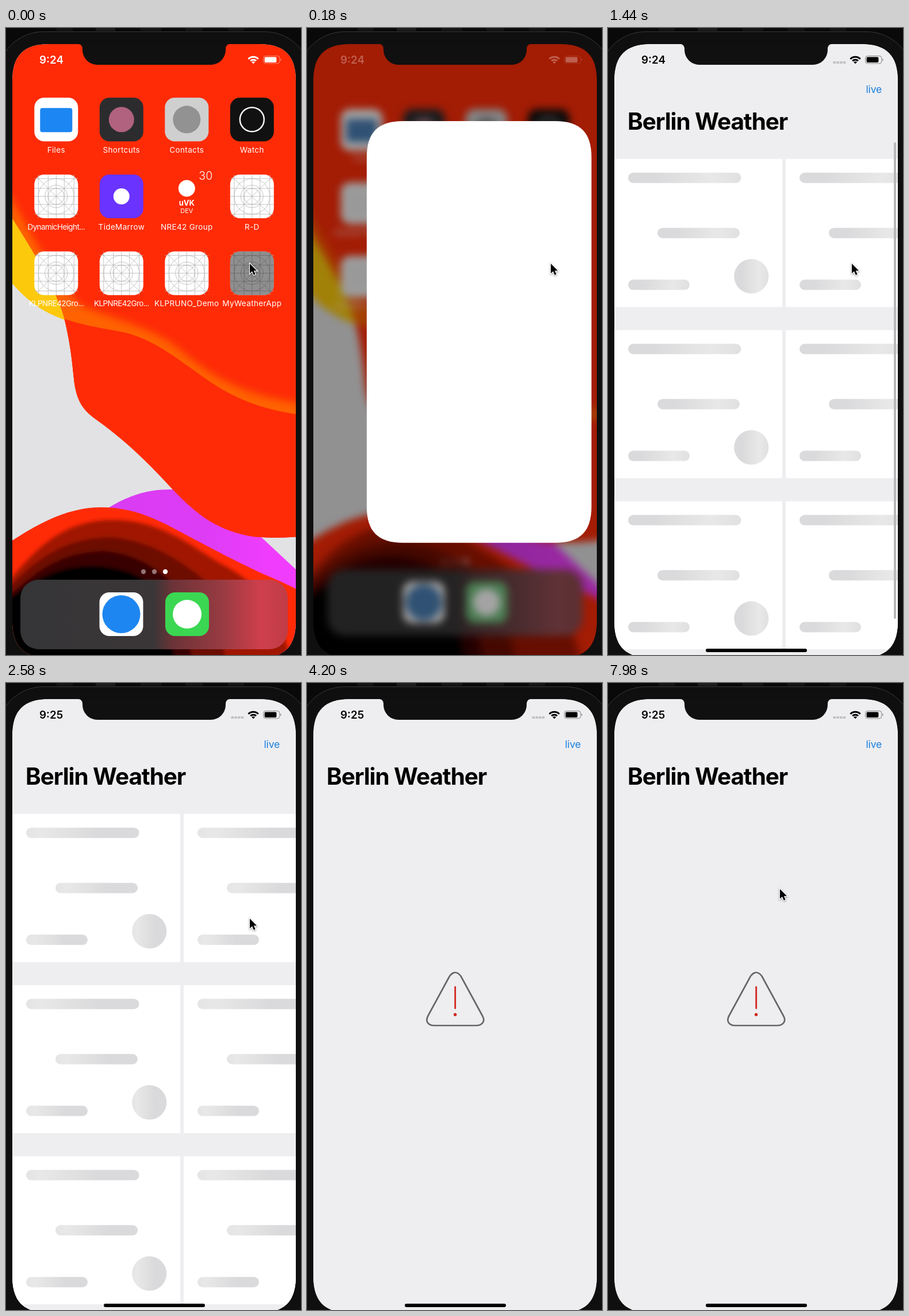
Recreate the animation shown at these times as an HTML page. Size 513x1091 px, loop 8000 ms.

```html
<!DOCTYPE html>
<html lang="en">
<head>
<meta charset="utf-8">
<title>Phone: opening a weather app</title>
<style>
html, body { margin: 0; width: 100%; height: 100%; overflow: hidden; background: #0e0e0e; }
svg { display: block; width: 513px; height: 1091px; }
text { font-family: Inter, "Liberation Sans", sans-serif; }
.label { font-size: 13.5px; fill: #fff; text-anchor: middle; letter-spacing: .35px; }
.tight { letter-spacing: -.6px; }
.clock { font-size: 18.8px; font-weight: 600; }
</style>
</head>
<body>
<svg viewBox="0 0 513 1091">
  <defs>
    <clipPath id="screen"><path id="screenShape"/></clipPath>
    <path id="redShape" d="M-30-30H550V880C500 888 460 888 430 885C370 875 335 850 290 803C240 748 200 712 155 680C135 665 122 650 118 610C115 580 112 550 102 508C90 460 40 370 -30 272Z"/>
    <clipPath id="redClip"><use href="#redShape"/></clipPath>
    <filter id="soft" x="-10%" y="-10%" width="120%" height="120%"><feGaussianBlur stdDeviation="7"/></filter>
    <filter id="softer" x="-10%" y="-30%" width="120%" height="160%"><feGaussianBlur stdDeviation="3"/></filter>
    <linearGradient id="dockFill">
      <stop offset="0" stop-color="#353537"/><stop offset=".5" stop-color="#3b3637"/>
      <stop offset=".57" stop-color="#6c3338"/><stop offset=".76" stop-color="#9a3b42"/>
      <stop offset=".9" stop-color="#cf3f4c"/><stop offset="1" stop-color="#c03c46"/>
    </linearGradient>
    <linearGradient id="purple">
      <stop offset="0" stop-color="#d93cf3"/><stop offset=".45" stop-color="#dd3cf5"/><stop offset=".75" stop-color="#f03dfd"/>
    </linearGradient>
    <linearGradient id="shine">
      <stop offset="0" stop-color="#dadadc"/><stop offset=".5" stop-color="#e8e8e8"/>
      <stop offset="1" stop-color="#dadadc"/>
    </linearGradient>
    <g id="gridTile">
      <rect x="-38" y="-38" width="76" height="76" rx="17" fill="#fff"/>
      <g fill="none" stroke="#b4b4b4" stroke-width=".8">
        <path d="M-38 0H38M0-38V38M-38-14H38M-38 14H38M-14-38V38M14-38V38M-38-31H38M-38 31H38M-31-38V38M31-38V38M-33-33L33 33M-33 33L33-33"/>
        <circle r="14"/><circle r="19.5"/><circle r="31"/>
      </g>
    </g>
    <g id="statusIcons">
      <g fill="none" stroke="currentColor" stroke-width="3">
        <path d="M421.5 54A12 12 0 0 1 438.7 54"/><path d="M425.2 57.3A7 7 0 0 1 435 57.3"/>
      </g>
      <path d="M430.1 62.3L427.2 59.4A4 4 0 0 1 433 59.4Z" fill="currentColor"/>
      <rect x="447.6" y="48.6" width="28.3" height="13.2" rx="4" fill="none" stroke="currentColor" stroke-opacity=".45"/>
      <rect x="449.6" y="50.4" width="20.8" height="9.6" rx="2" fill="currentColor"/>
      <path d="M477.4 53Q480 55.2 477.4 57.5Z" fill="currentColor" opacity=".5"/>
    </g>
  </defs>

  <!-- bezel -->
  <rect width="513" height="1091" fill="#090909"/>
  <path d="M88 0h28v5h-28zM234 0h36v5h-36zM312 0h30v5h-30zM386 0h28v5h-28z" fill="#151515"/>
  <path d="M156 0h34v5h-34z" fill="#1d1d1d"/>
  <rect x="-15" y="6.5" width="545" height="1200" rx="80" fill="#0f0f0f" stroke="#393939"/>

  <g clip-path="url(#screen)">
    <g id="home">
      <g id="wall">
        <rect x="-30" y="-30" width="580" height="1160" fill="#e2e2e4"/>
        <path d="M178 835C215 812 250 802 290 803L445 887L550 985V1130H178Z" fill="url(#purple)"/>
        <use href="#redShape" fill="#fe2b06"/>
        <g clip-path="url(#redClip)">
          <path d="M-30 235C30 320 72 430 132 484C200 510 260 524 300 558C360 608 420 648 550 656V760H-30Z" fill="#ff6200" filter="url(#soft)"/>
          <path d="M50 484C120 520 165 520 215 532C260 546 290 570 330 598C380 634 430 668 550 677V900H50Z" fill="#fe2b06"/>
        </g>
        <path d="M-30 272C40 370 90 460 102 508C60 492 40 477 11 445L-30 405Z" fill="#fdc90c"/>
        <path d="M-30 920C40 870 100 834 165 834C215 834 255 850 300 875C360 907 400 928 445 949C470 960 490 967 550 1000V1130H-30Z" fill="#fe2b06"/>
        <g filter="url(#softer)">
          <path d="M-30 1010C40 915 90 855 190 856C270 858 320 900 370 930C420 958 480 990 500 1130H-30Z" fill="#a01602"/>
          <path d="M-30 1015C40 930 90 889 180 886C250 890 310 930 350 965L390 1130H-30Z" fill="#6c0c02"/>
          <path d="M-30 1020C50 945 90 912 170 910C230 915 270 945 300 975L330 1130H-30Z" fill="#380502"/>
          <path d="M-30 1020C50 955 90 937 150 936C215 938 245 960 270 985L300 1130H-30Z" fill="#000"/>
        </g>
      </g>
      <g id="icons">
        <rect x="25" y="960" width="465" height="121" rx="32" fill="url(#dockFill)"/>
        <g fill="#fff">
          <circle cx="239" cy="946" r="4.2" opacity=".45"/>
          <circle cx="258" cy="946" r="4.2" opacity=".45"/>
          <circle cx="277" cy="946" r="4.2"/>
        </g>
      </g>
    </g>
    <g id="homeStatus" color="#fff">
      <text class="clock" x="58" y="62" fill="#fff">9:24</text>
      <use href="#statusIcons"/>
    </g>

    <path id="card" fill="#fff"/>

    <g id="app">
      <rect x="11" y="28" width="493" height="1068" fill="#eeeef0"/>
      <text x="448.5" y="113" font-size="17.6" letter-spacing="-.15" fill="#1a7fdc">live</text>
      <text x="34" y="176.5" font-size="40.5" font-weight="700" letter-spacing="-1.1">Berlin Weather</text>
      <g id="cells"></g>
      <rect id="scroll" x="497" y="199" width="4" height="829" rx="2" fill="#b8b8ba"/>
      <g id="warning" fill="none" stroke-linecap="round">
        <path d="M248 510Q258 497.5 267.5 510L305 579C311 589 304 596 294 596H221C211 596 205 589 210.5 579Z" stroke="#666" stroke-width="2.7"/>
        <path d="M257.7 529V566" stroke="#d3241c" stroke-width="2.8"/>
        <circle cx="257.6" cy="577" r="2.7" fill="#d3241c"/>
      </g>
    </g>
    <g id="appStatus" color="#000">
      <text id="clock" class="clock" x="58" y="62">9:24</text>
      <path d="M391.5 58h4.5v4h-4.5zM397.3 58h4.5v4h-4.5zM403 58h4.5v4h-4.5zM408.7 58h4.5v4h-4.5z" fill="#c1c1c4"/>
      <use href="#statusIcons"/>
    </g>
    <rect id="bar" width="176" height="6" rx="3"/>
  </g>
  <path d="M126 27V28A7 8 0 0 1 133 36V38A26 26 0 0 0 159 64H356A26 26 0 0 0 382 38V36A7 8 0 0 1 389 28V27Z" fill="#101010"/>
  <path id="cursor" d="M0 0V17L4 13.3L6.8 19.7L9.6 18.5L6.9 12.2H12.2Z" stroke="#fff" stroke-width="2.4" paint-order="stroke" style="filter:drop-shadow(0 1.5px 1.5px rgba(0,0,0,.4))"/>
</svg>
<script>
const LOOP = 8000, STEP = 60;
const $ = id => document.getElementById(id);
const set = (el, attrs) => { for (const k in attrs) el.setAttribute(k, attrs[k]); };
const show = (id, opacity) => {
  $(id).style.display = opacity > 0 ? '' : 'none';
  $(id).style.opacity = opacity;
};

// Piecewise linear value from [time, value] pairs
function track(t, keys) {
  if (t <= keys[0][0]) return keys[0][1];
  for (let i = 1; i < keys.length; i++) {
    const [a, u] = keys[i - 1], [b, v] = keys[i];
    if (t < b) return u + (v - u) * (t - a) / (b - a);
  }
  return keys[keys.length - 1][1];
}

// Rectangle with continuous corners that reach e along each side
function squircle(x, y, w, h, e) {
  const k = e * .69, c = e - k, s = w - 2 * e, v = h - 2 * e;
  return `M${x + e} ${y}h${s}c${k} 0 ${e} ${c} ${e} ${e}v${v}c0 ${k} ${-c} ${e} ${-e} ${e}` +
    `h${-s}c${-k} 0 ${-e} ${-c} ${-e} ${-e}v${-v}c0 ${-k} ${c} ${-e} ${e} ${-e}z`;
}
set($('screenShape'), { d: squircle(11, 28, 493, 1068, 64) });

const plain = (fill, mark = '') =>
  `<rect x="-38" y="-38" width="76" height="76" rx="17" fill="${fill}"/>${mark}`;
const disc = (fill, r) => `<circle r="${r}" fill="${fill}"/>`;
const grid = '<use href="#gridTile"/>';
const group = `<circle cy="-14" r="14.5" fill="#fff"/>
  <g fill="#fff" text-anchor="middle"><text y="16" font-size="13" font-weight="700">uVK</text>
  <text y="29" font-size="11">DEV</text><text x="33" y="-29" font-size="19.5" font-weight="300">30</text></g>`;

const apps = [
  ['Files', plain('#fff', '<rect x="-28" y="-20" width="56" height="42" rx="4" fill="#1c86f2"/>')],
  ['Shortcuts', plain('#2c2c2f', disc('#b0627e', 22))],
  ['Contacts', plain('#cfcfcf', disc('#929292', 24))],
  ['Watch', plain('#111', '<circle r="21" fill="none" stroke="#f4f4f4" stroke-width="2.5"/>')],
  ['DynamicHeight...', grid, 1],
  ['TideMarrow', plain('#6a33ff', disc('#fff', 14))],
  ['NRE42 Group', group],
  ['R-D', grid],
  ['KLPNRE42Gro...', grid, 1],
  ['KLPNRE42Gro...', grid, 1],
  ['KLPRUNO_Demo', grid],
  ['MyWeatherApp', grid + '<rect x="-38" y="-38" width="76" height="76" rx="17" opacity=".44"/>'],
];
const place = (x, y, body) => `<g transform="translate(${x} ${y})">${body}</g>`;
$('icons').innerHTML += apps.map(([name, art, tight], i) =>
  place(87.3 + i % 4 * 113.5, 159.3 + (i >> 2) * 133.7,
    art + `<text class="label${tight ? ' tight' : ''}" y="57.5">${name}</text>`)).join('')
  + place(200.5, 1020, plain('#fff', disc('#1e86f0', 33)))
  + place(315, 1020, plain('#3bd752', disc('#fff', 25)));

const pill = (x, y, w) => `<rect x="${x}" y="${y}" width="${w}" height="18" rx="9"/>`;
const cell = '<rect width="292" height="257.5" fill="#fff"/><g fill="url(#shine)">'
  + pill(24, 23.7, 196.5) + pill(75, 119.7, 143) + pill(24, 209.8, 107)
  + '<circle cx="238.3" cy="204" r="30"/></g>';
for (let i = 0; i < 6; i++)
  $('cells').innerHTML += place(11 + i % 2 * 298, 228 + (i >> 1) * 297.8, cell);

function launch(t) {
  const move = track(t, [[0, 0], [60, .18], [120, .5], [180, .755], [240, .89], [300, .957], [360, .99], [480, 1]]);
  const grow = track(t, [[0, 0], [60, .13], [120, .4], [180, .663], [240, .84], [300, .94], [360, .982], [480, 1]]);
  const w = 76 + 417 * move, h = 76 + 992 * grow;
  const cx = 428 - 170.5 * move, cy = 427 + 135 * move;
  const corner = 22 + 42 * Math.min(1, move * 1.3);
  set($('card'), { d: squircle(cx - w / 2, cy - h / 2, w, h, corner) });
  show('card', track(t, [[0, 0], [60, .7], [120, 1]]));

  // the home screen sinks back: blurred, darker, slightly smaller
  const back = track(t, [[0, 0], [60, .2], [120, .65], [180, 1]]);
  const dim = track(t, [[0, 1], [60, .92], [180, .64], [360, .48]]);
  $('home').style.filter = back ? `blur(${7 * back}px) brightness(${dim})` : 'none';
  $('icons').style.filter = back ? `saturate(${1 - .5 * back})` : 'none';
  set($('wall'), { transform: `translate(${-17 * back} ${8 * back})` });
  set($('icons'), { transform: `translate(257.5 561) scale(${1 - .045 * back}) translate(-257.5 -561)` });
  show('home', t < 600 ? 1 : 0);
  show('homeStatus', track(t, [[0, 1], [60, .8], [180, .3], [240, 0]]));

  const settle = track(t, [[300, 0], [360, .1], [480, 1]]);
  set($('bar'), { x: 171.8 - 1.8 * settle, y: 1075.6 + 4.4 * settle });
  show('bar', track(t, [[240, 0], [360, 1]]));
}

function weather(t) {
  show('app', t >= 1440 ? 1 : 0);
  show('appStatus', t >= 1080 ? 1 : 0);
  $('clock').textContent = t < 1800 ? '9:24' : '9:25';

  // a light band slides across each placeholder every 1.5 s, easing in
  const phase = ((Math.min(t, 2760) - 1440) / 1500 + 1.75) % 1;
  const left = 2 * Math.pow(phase, 1.7) - 1;
  set($('shine'), { x1: left, x2: left + 1 });
  show('cells', track(t, [[2880, 1], [3180, 0]]));
  show('scroll', track(t, [[2280, 1], [2520, 0]]));
  show('warning', track(t, [[3000, 0], [3420, 1]]));
}

function pointer(t) {
  const x = track(t, [[3720, 424], [4200, 14], [4201, 490], [6960, 490], [7560, 408], [7740, 408], [7980, 299]]);
  const y = track(t, [[3720, 410], [4200, 1045], [4201, 560], [6960, 560], [7560, 345], [7740, 345], [7980, 358.5]]);
  set($('cursor'), { transform: `translate(${x} ${y})` });
  show('cursor', t < 4200 || t >= 7020 ? 1 : 0);
}

function draw(now) {
  const t = Math.floor(now % LOOP / STEP) * STEP;
  launch(t);
  weather(t);
  pointer(t);
}
const start = performance.now();
function tick() {
  draw(performance.now() - start);
  requestAnimationFrame(tick);
}
tick();
</script>
</body>
</html>
```
